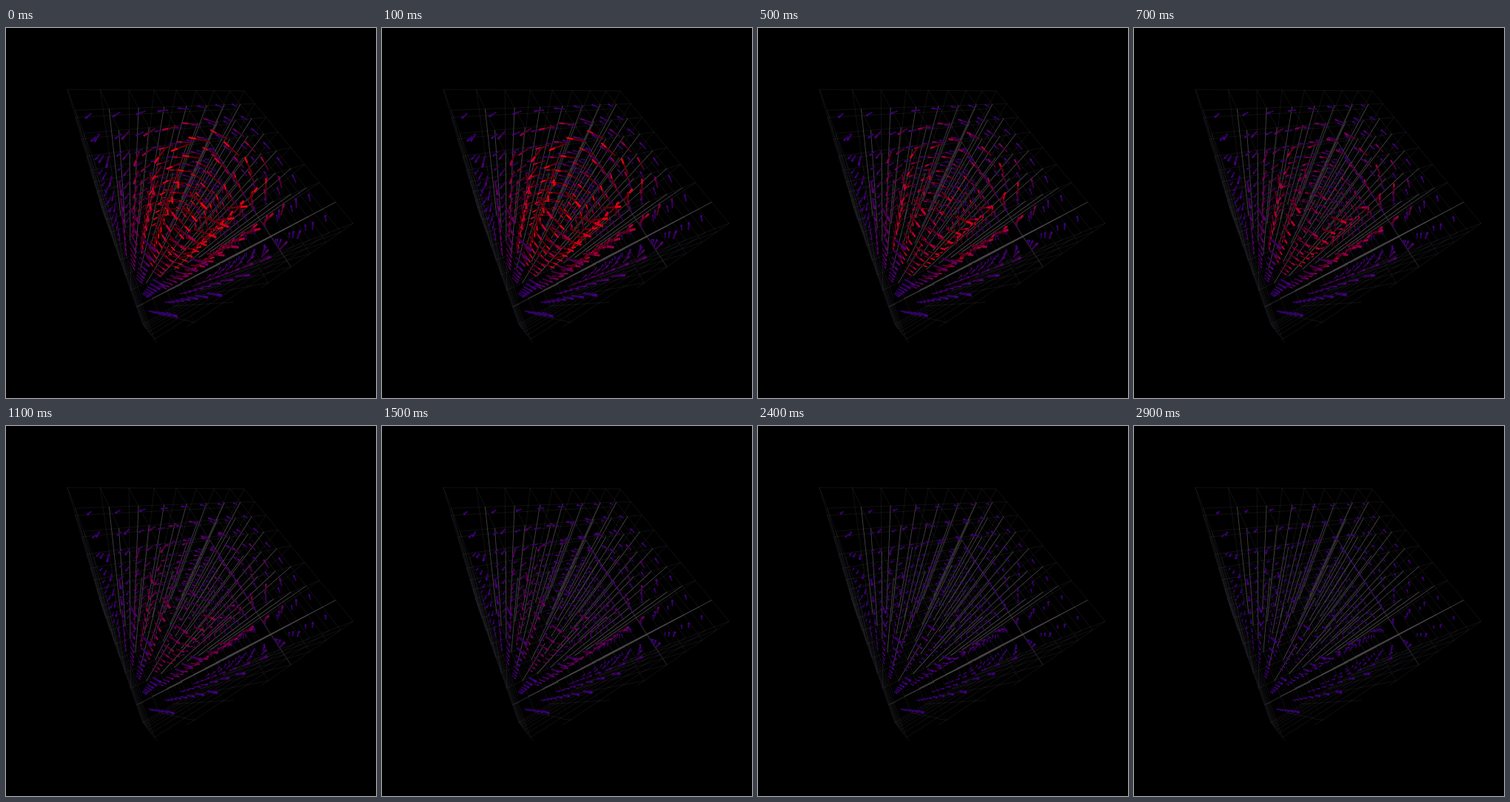
These frames come from a looping animation (500 px wide and 500 px high, 3000 ms). An HTML page with a canvas:

```html
<!DOCTYPE html>
<html>
<head>
<meta charset="utf-8">
<title>Decaying vortex</title>
<style>
html, body { margin: 0; height: 100%; overflow: hidden; background: #000; }
canvas { display: block; }
</style>
</head>
<body>
<canvas id="stage" width="500" height="500"></canvas>
<script>
const ctx = document.getElementById('stage').getContext('2d');
const N = 8, NEAR = 0.5, LOOP = 3000, STEP = 100;
const CENTER_U = 3.85, CENTER_V = 4.05;

// Homogeneous corner and full edge vectors of the cube: [x * depth, y * depth, depth]
const corner = [51.9, 51.9, 0.625];
const edges = [[270.1, 33.1, 0.375], [28.8, 112.5, -0.252], [122.7, 276.3, 0.728]];

const point = (u, v, w) => corner.map((c, i) =>
  c + (u * edges[0][i] + v * edges[1][i] + w * edges[2][i]) / N);
const mix = (a, b, k) => a.map((c, i) => c + (b[i] - c) * k);
const screen = p => [p[0] / p[2], p[1] / p[2]];
const clamp = x => Math.max(0, Math.min(1, x));

// Cuts a segment at the near plane; null when all of it is too close
function clip(a, b) {
  if (a[2] < NEAR && b[2] < NEAR) return null;
  const cut = mix(a, b, (NEAR - a[2]) / (b[2] - a[2]));
  return [a[2] < NEAR ? cut : a, b[2] < NEAR ? cut : b];
}

function line(a, b, color, width) {
  const seg = clip(a, b);
  if (!seg) return;
  ctx.strokeStyle = color;
  ctx.lineWidth = width;
  ctx.beginPath();
  ctx.moveTo(...screen(seg[0]));
  ctx.lineTo(...screen(seg[1]));
  ctx.stroke();
}

const isInner = i => i > 0 && i < N;

function drawGrid() {
  for (let i = 0; i <= N; i++) {
    for (let j = 0; j <= N; j++) {
      const shade = k => `rgba(140,140,165,${isInner(i) && isInner(k) ? 0.06 : 0.15})`;
      line(point(0, i, j), point(N, i, j), shade(j), 0.8);
      line(point(i, 0, j), point(i, N, j), shade(j), 0.8);
      if (!isInner(i) || !isInner(j)) line(point(i, j, 0), point(i, j, N), shade(j), 0.8);
    }
  }
  ctx.globalCompositeOperation = 'lighten';
  for (let i = 1; i < N; i++) {
    for (let j = 1; j < N; j++) line(point(i, j, 0), point(i, j, N), '#4a4548', 0.8);
  }
  line(point(0, 7, 0), point(N, 7, 0), '#3a3538', 0.9);
  line(point(4, 3, 0), point(4, N, 0), '#28232c', 1);
  ctx.globalCompositeOperation = 'source-over';
}

// Swirl around the cube's middle axis whose core spreads as it weakens
function speed(r, t) {
  const core = 1 - Math.exp(-(r ** 3) / (4 + 5 * t));
  return 2.5 / r ** 1.25 * core / (1 + 0.4 * t);
}

function drawArrow(u, v, w, t) {
  const tail = point(u, v, w);
  if (tail[2] < NEAR) return;
  const du = u - CENTER_U, dv = v - CENTER_V, r = Math.hypot(du, dv);
  const s = speed(r, t);
  const tip = point(u + dv / r * s, v - du / r * s, w);
  const tilt = 1 + 0.05 * (v - u);
  const heat = clamp((s * tilt - 0.2) / 0.45) * Math.exp(-((r / 3.2) ** 4));
  const rgb = [66 + 189 * heat ** 1.3, 0, 132 - 122 * heat];
  const color = k => `rgb(${rgb.map(c => c * k)})`;
  const width = 1.9 / tail[2];
  line(tail, tip, color(0.75 - 0.35 * heat), width * 0.85);
  line(mix(tail, tip, 0.65), tip, color(0.95), width);
}

function draw(t) {
  ctx.fillStyle = '#000';
  ctx.fillRect(0, 0, 500, 500);
  drawGrid();
  for (let w = N - 0.5; w > 0; w--)
    for (let u = 0.5; u < N; u++)
      for (let v = 0.5; v < N; v++) drawArrow(u, v, w, t);
}

function frame() {
  const ms = performance.now() % LOOP;
  draw(Math.floor(ms / STEP) * STEP / 1000);
  requestAnimationFrame(frame);
}
frame();
</script>
</body>
</html>
```
